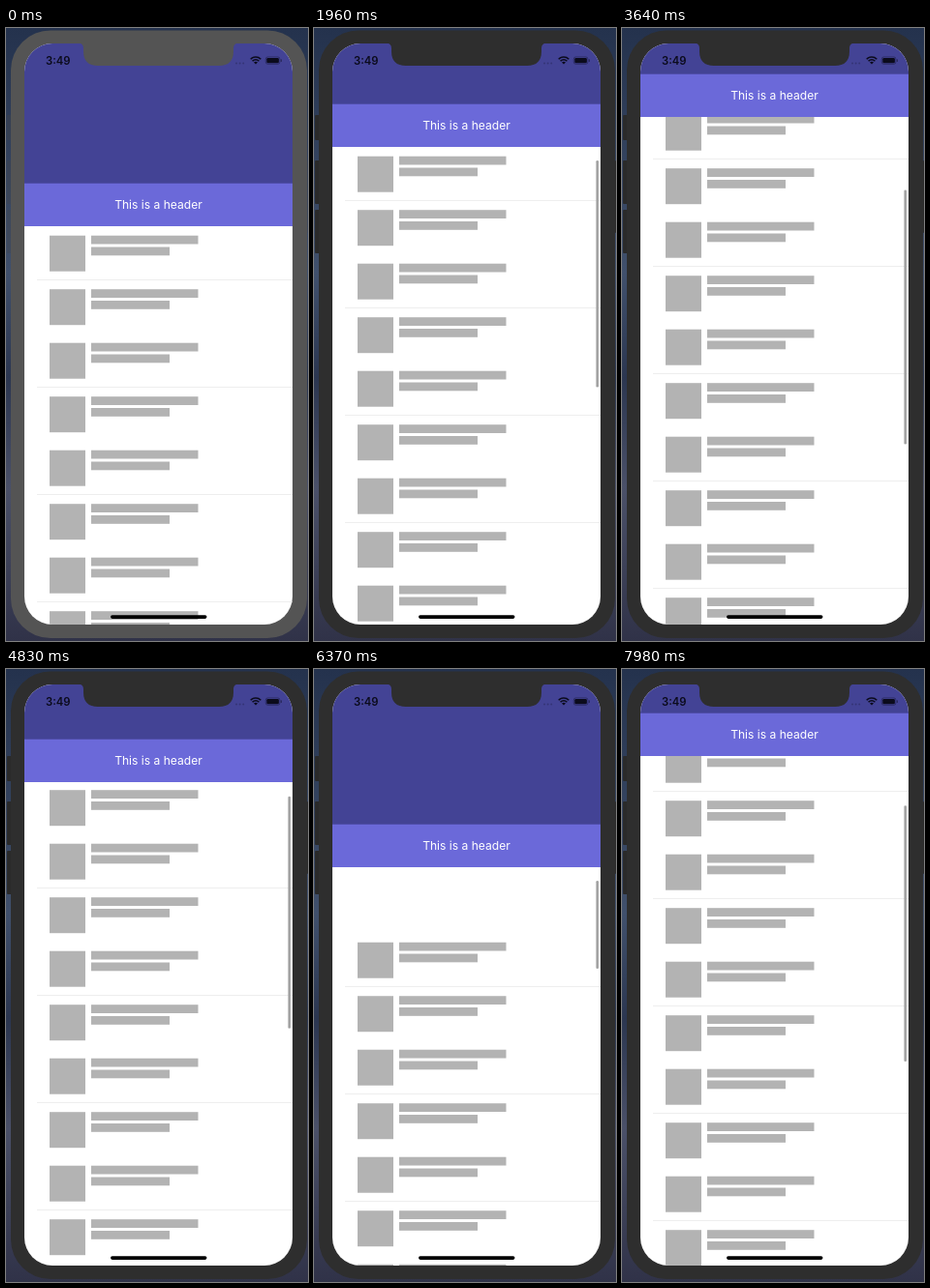
These frames come from a looping animation (312 px wide and 634 px high, 8000 ms). An HTML page:

```html
<!DOCTYPE html>
<html lang="en">
<head>
<meta charset="utf-8">
<title>Collapsing header</title>
<style>
  html, body { margin: 0; width: 100%; height: 100%; overflow: hidden; background: #26344f; }
  svg { display: block; width: 312px; height: 634px; }
  text { font-family: Inter, Roboto, sans-serif; }
</style>
</head>
<body>
<svg viewBox="0 0 312 634">
  <defs>
    <linearGradient id="desk" x2="0" y2="1">
      <stop offset="0" stop-color="#24324d"/>
      <stop offset=".4" stop-color="#40506c"/>
      <stop offset=".57" stop-color="#2b3650"/>
      <stop offset=".75" stop-color="#4a5068"/>
      <stop offset="1" stop-color="#303248"/>
    </linearGradient>
    <clipPath id="screen"><rect x="19" y="16" width="277" height="601" rx="29"/></clipPath>
  </defs>

  <rect width="312" height="634" fill="url(#desk)"/>
  <g id="buttons">
    <rect x="1" y="90" width="6" height="26" rx="1"/>
    <rect x="1" y="137" width="6" height="45" rx="1"/>
    <rect x="1" y="188" width="6" height="45" rx="1"/>
    <rect x="308" y="137" width="4" height="75" rx="1"/>
  </g>
  <rect id="bezel" x="5" y="2.5" width="306" height="628.5" rx="41"/>

  <g clip-path="url(#screen)">
    <rect x="19" y="16" width="277" height="601" fill="#fff"/>
    <g id="list"></g>
    <rect id="thumb" x="291.4" width="2.6" rx="1.3" fill="#a3a3a3"/>
    <rect id="cover" x="19" y="16" width="277" fill="#434395"/>
    <g id="header">
      <rect x="19" width="277" height="44.3" fill="#6b69d9"/>
      <text x="157.5" y="26.8" font-size="12.1" text-anchor="middle" fill="#fff">This is a header</text>
    </g>
    <rect x="108" y="607.3" width="99.5" height="3.6" rx="1.8" fill="#000"/>
  </g>

  <path id="notch" d="M75 15.5 Q80 16 80 21 V24 Q80 39 95 39 H220 Q235 39 235 24 V21 Q235 16 240 15.5 Z"/>

  <g fill="#0b0b1c">
    <text x="41" y="37.6" font-size="11.3" font-weight="600">3:49</text>
    <g opacity=".25">
      <circle cx="238" cy="36.5" r="1"/><circle cx="241.6" cy="36.5" r="1"/><circle cx="245.2" cy="36.5" r="1"/>
    </g>
    <path d="M258 37.6 L256 35.6 A2.9 2.9 0 0 1 260 35.6 Z"/>
    <g fill="none" stroke="#0b0b1c" stroke-width="1.5">
      <path d="M254.6 34.2 A4.8 4.8 0 0 1 261.4 34.2"/>
      <path d="M252.7 32.2 A7.5 7.5 0 0 1 263.3 32.2"/>
    </g>
    <rect x="268.3" y="29.9" width="14.6" height="7.4" rx="2.2" fill="none" stroke="#0b0b1c" stroke-opacity=".45" stroke-width=".8"/>
    <rect x="269.3" y="30.9" width="12.6" height="5.4" rx="1.3"/>
    <rect x="283.8" y="32.2" width="1.1" height="2.8" rx=".5" opacity=".5"/>
  </g>
</svg>

<script>
const LOOP = 8000, STEP = 70, ROW = 55.5, ROWS = 20, HEADER = 44.3;

// time in ms, bottom edge of the header, scroll offset of the list
const KEYS = [
  [0, 205, 0], [1190, 205, 0], [1960, 123, 0], [2170, 92, 0],
  [2520, 92, 24], [2660, 92, 24], [3360, 92, 135], [3640, 92, 123],
  [4340, 92, 8], [4550, 116, 1.5], [4760, 116, 1.5], [4830, 117, 1.5],
  [5600, 205, .5], [5740, 205, .5], [6440, 205, -70], [7070, 205, -36.5],
  [7280, 205, 0], [7630, 90, 0], [7980, 90, 74.5], [8000, 90, 74.5]
];

const $ = id => document.getElementById(id);
const clamp = (v, lo, hi) => Math.min(hi, Math.max(lo, v));

function add(parent, attrs) {
  const el = document.createElementNS("http://www.w3.org/2000/svg", "rect");
  for (const name in attrs) el.setAttribute(name, attrs[name]);
  return parent.appendChild(el);
}

function set(id, attrs) {
  for (const name in attrs) $(id).setAttribute(name, attrs[name]);
}

// Monotone cubic through one column of KEYS: no overshoot, flat at turning points.
function track(t, col) {
  const i = clamp(KEYS.findIndex(k => k[0] > t) - 1, 0, KEYS.length - 2);
  const rate = n => n < 0 || n > KEYS.length - 2 ? 0
    : (KEYS[n + 1][col] - KEYS[n][col]) / (KEYS[n + 1][0] - KEYS[n][0]);
  const tangent = n => {
    const a = rate(n - 1), b = rate(n);
    return a * b <= 0 ? 0 : 2 * a * b / (a + b);
  };
  const span = KEYS[i + 1][0] - KEYS[i][0], u = (t - KEYS[i][0]) / span;
  const from = KEYS[i][col], to = KEYS[i + 1][col], w = u * u * (3 - 2 * u);
  return from + (to - from) * w
    + span * u * (1 - u) * (tangent(i) * (1 - u) - tangent(i + 1) * u);
}

const list = $("list");
const blocks = document.createElementNS("http://www.w3.org/2000/svg", "g");
blocks.setAttribute("fill", "#b3b3b3");
list.append(blocks);
const lines = [];
for (let r = 0; r < ROWS; r++) {
  const y = r * ROW;
  add(blocks, { x: 45, y: y + 9.7, width: 37, height: 37 });
  add(blocks, { x: 88, y: y + 9.7, width: 110.5, height: 8.8 });
  add(blocks, { x: 88, y: y + 21.5, width: 81, height: 8.8 });
  lines.push(add(list, { x: 32, width: 264, height: 1, fill: "#eeeeee" }));
}

function draw(t) {
  const bottom = track(t, 1), offset = track(t, 2), top = bottom - offset;

  blocks.setAttribute("transform", `translate(0 ${top})`);
  // Hairlines only show when they fall near the middle of a pixel.
  lines.forEach((line, r) => {
    const y = top + (r + 1) * ROW, part = y - Math.floor(y);
    line.setAttribute("y", Math.floor(y));
    line.setAttribute("visibility", part >= .25 && part < .75 ? "visible" : "hidden");
  });

  set("header", { transform: `translate(0 ${bottom - HEADER})` });
  set("cover", { height: bottom - 17 });
  set("thumb", {
    y: bottom + 14 + Math.max(0, offset) * .5,
    height: 159 + (205 - bottom) * .92 + Math.min(0, offset),
    opacity: clamp((t - 1190) / 140, 0, 1)
  });

  const dim = clamp((t - 910) / 210, 0, 1);
  const grey = v => `rgb(${v},${v},${v})`;
  const shell = grey(Math.round(84 - 38 * dim));
  set("bezel", { fill: shell });
  set("notch", { fill: shell });
  set("buttons", { fill: grey(Math.round(70 - 28 * dim)), opacity: .3 + .7 * dim });
}

const start = performance.now();
function tick() {
  const t = (performance.now() - start) % LOOP;
  draw(Math.floor(t / STEP) * STEP);
  requestAnimationFrame(tick);
}
tick();
</script>
</body>
</html>
```
